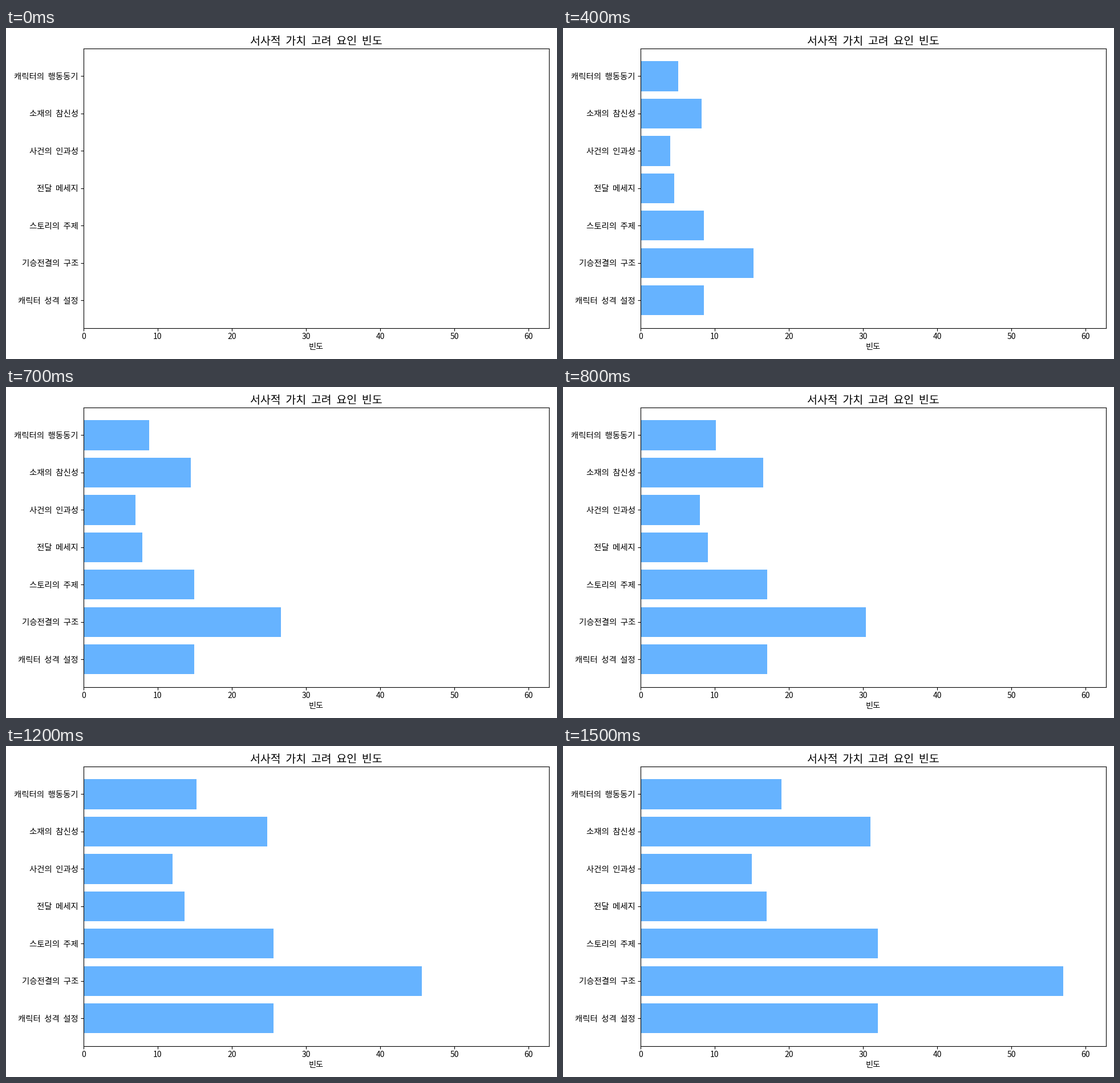
Recreate the animation shown at these times as a matplotlib script. Size 966x580 px, loop 1.55 s.

```python
import matplotlib.pyplot as plt
from matplotlib.animation import FuncAnimation

plt.rcParams["font.family"] = "Noto Sans CJK JP"

W, H, DPI = 966, 580, 100
LEFT, RIGHT, TOP, BOTTOM = 135.75, 951.6, 35.95, 525.65  # axes edges in pixels
FRAMES, INTERVAL = 31, 50

factors = {
    "캐릭터 성격 설정": 32,
    "기승전결의 구조": 57,
    "스토리의 주제": 32,
    "전달 메세지": 17,
    "사건의 인과성": 15,
    "소재의 참신성": 31,
    "캐릭터의 행동동기": 19,
}
counts = list(factors.values())
x_max = max(counts) * 1.1
y_min, y_max = -0.74, len(counts) - 0.26

fig = plt.figure(figsize=(W / DPI, H / DPI), dpi=DPI, facecolor="white")
ax = fig.add_axes([LEFT / W, 1 - BOTTOM / H, (RIGHT - LEFT) / W, (BOTTOM - TOP) / H])
bars = ax.barh(range(len(counts)), [0] * len(counts), height=0.8, color="#66b3ff")
ax.set_xlim(0, x_max)
ax.set_ylim(y_min, y_max)
ax.set_xticks(range(0, 61, 10))
ax.set_yticks(range(len(counts)))
ax.tick_params(labelbottom=False, labelleft=False)


def put(x, y, text, size, ha="center"):
    """Place text with its baseline at pixel (x, y) from the top left."""
    # doubled spaces give the wide word gaps of the labels
    fig.text(x / W, 1 - y / H, text.replace(" ", "  "), size=size, ha=ha, va="baseline")


middle = (LEFT + RIGHT) / 2
put(middle, 29.2, "서사적 가치 고려 요인 빈도", 14)
put(middle, 562.8, "빈도", 10.2)
for tick in range(0, 61, 10):
    put(LEFT + (RIGHT - LEFT) * tick / x_max, 544.7, str(tick), 10)
for row, name in enumerate(factors):
    y = BOTTOM - (BOTTOM - TOP) * (row - y_min) / (y_max - y_min)
    put(127, y + 5.4, name, 10.4, ha="right")


def update(frame):
    for bar, count in zip(bars, counts):
        bar.set_width(count * frame / (FRAMES - 1))
    return list(bars)


anim = FuncAnimation(fig, update, frames=FRAMES, interval=INTERVAL, repeat=True, repeat_delay=0)
plt.show()
```
